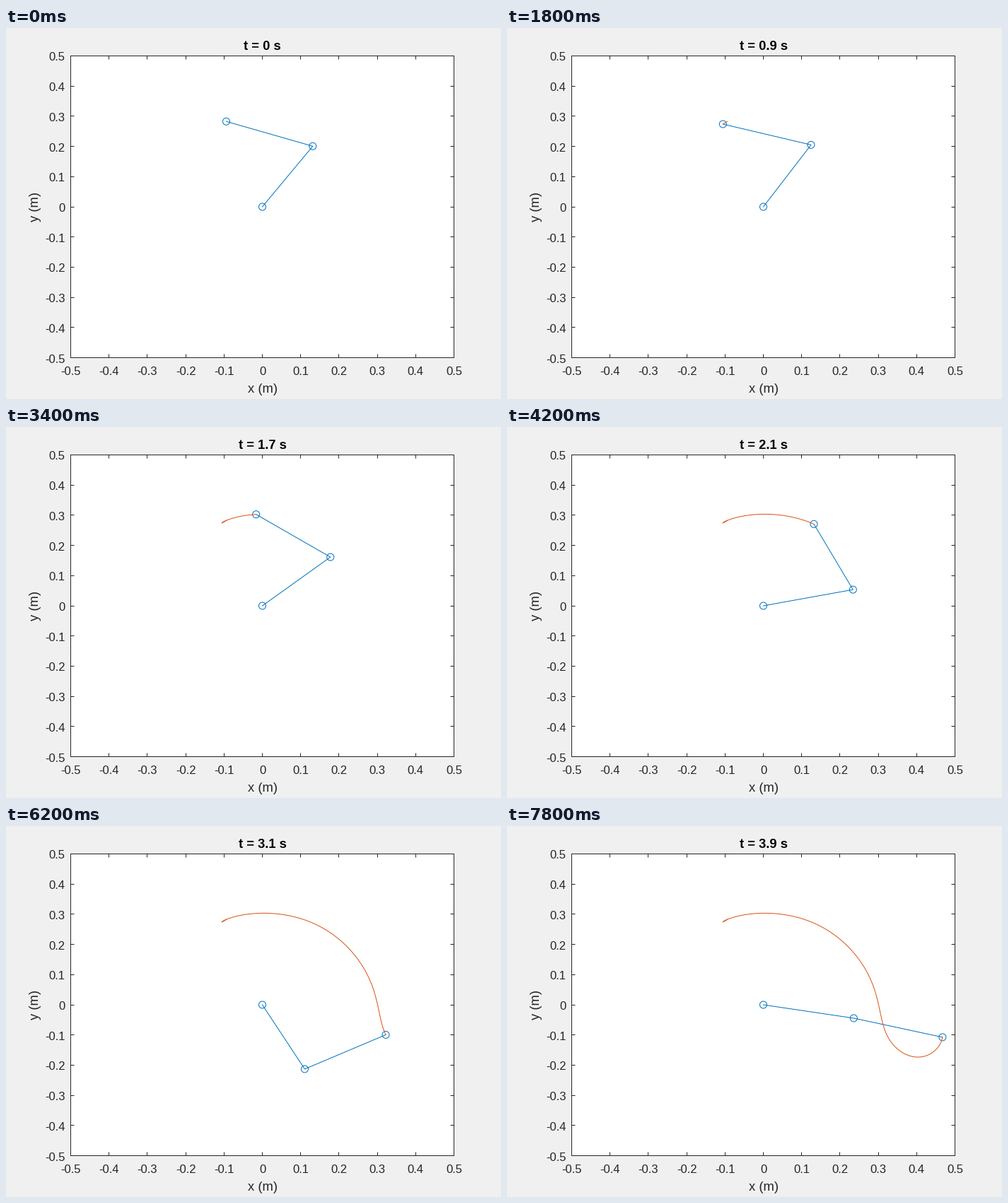
Write a matplotlib script that moves like this. It is 700 by 525 pixels and loops after 8 s.

```python
import numpy as np
import matplotlib.pyplot as plt
from matplotlib.animation import FuncAnimation
from matplotlib.collections import EllipseCollection
from matplotlib.transforms import Affine2D

W, H, DPI = 700, 525, 120
LEFT, TOP, RIGHT, BOTTOM = 91, 39, 633, 466    # plot box in pixels
FRAMES, INTERVAL = 40, 200
STEP = 0.1      # simulated seconds per frame
SUB = 10        # trail points per frame
LINK = 0.24     # length of each arm segment (m)
PX = 72 / DPI   # one pixel in points
BLUE, ORANGE, INK = "#0072BD", "#D95319", "#262626"

plt.rcParams["font.family"] = "Liberation Sans"


def spline(x, y, slope0, slope1, t):
    """Cubic spline through (x, y) with given end slopes."""
    x, y = np.array(x), np.array(y)
    h, d = np.diff(x), np.diff(y) / np.diff(x)
    n = len(x)
    a, b = np.eye(n), np.zeros(n)
    b[0], b[-1] = slope0, slope1
    for i in range(1, n - 1):
        a[i, i - 1:i + 2] = h[i], 2 * (h[i - 1] + h[i]), h[i - 1]
        b[i] = 3 * (h[i] * d[i - 1] + h[i - 1] * d[i])
    m = np.linalg.solve(a, b)
    k = np.clip(np.searchsorted(x, t, side="right") - 1, 0, n - 2)
    u, hk = (t - x[k]) / h[k], h[k]
    return (y[k] * (1 + 2 * u) * (1 - u) ** 2 + y[k + 1] * u**2 * (3 - 2 * u)
            + hk * m[k] * u * (1 - u) ** 2 - hk * m[k + 1] * u**2 * (1 - u))


# Shoulder and relative elbow angles (rad) at a few key times
keys = [0, 0.5, 1.0, 1.3, 1.8, 2.1, 2.4, 2.7, 3.1, 3.6, 3.9]
shoulder = [0.991, 1.0045, 1.026, 0.986, 0.634, 0.225,
            -0.278, -0.754, -1.092, -0.731, -0.186]
elbow = [1.802, 1.812, 1.823, 1.800, 1.771, 1.785,
         1.833, 1.819, 1.585, 0.685, -0.080]

time = np.arange((FRAMES - 1) * SUB + 1) * STEP / SUB
q1 = spline(keys, shoulder, 0, 2.05, time)
q2 = q1 + spline(keys, elbow, 0, -2.75, time)
jx, jy = LINK * np.cos(q1), LINK * np.sin(q1)
ex, ey = jx + LINK * np.cos(q2), jy + LINK * np.sin(q2)

fig = plt.figure(figsize=(W / DPI, H / DPI), dpi=DPI, facecolor="#F0F0F0")
ax = fig.add_axes([LEFT / W, 1 - BOTTOM / H,
                   (RIGHT - LEFT) / W, (BOTTOM - TOP) / H])
ax.set(xlim=(-0.5, 0.5), ylim=(-0.5, 0.5))
ticks = np.arange(-5, 6) / 10
ax.set_xticks(ticks)
ax.set_yticks(ticks)
ax.tick_params(direction="in", length=5.4 * PX, width=PX, color=INK,
               top=True, right=True, labelbottom=False, labelleft=False)
for spine in ax.spines.values():
    spine.set(linewidth=PX, color=INK)


def label(x, y, text, size=10, color=INK, ha="center", **kw):
    """Text with its baseline at pixel (x, y), y counted from the top."""
    return fig.text(x / W, 1 - y / H, text, size=size, color=color,
                    ha=ha, va="baseline", **kw)


for v in ticks:
    label(362.5 + (RIGHT - LEFT) * v, 491, f"{v:g}")
    label(83.5, 260 - (BOTTOM - TOP) * v, f"{v:g}", ha="right")
label(362.8, 516, "x (m)", 11)
label(45.5, 253, "y (m)", 11, rotation=90, rotation_mode="anchor")
title = label(362.8, 31.3, "", 11, "black", weight="bold")

# Data points sit on pixel centres, like the snapped axis lines
centred = ax.transData + Affine2D().translate(0.5, -0.5)
arm, = ax.plot([], [], color=BLUE, lw=PX, transform=centred)
rings = EllipseCollection([10] * 3, [10] * 3, [0] * 3, units="dots",
                          offsets=np.zeros((3, 2)), offset_transform=centred,
                          facecolors="none", edgecolors=BLUE, linewidths=PX,
                          zorder=2)
ax.add_collection(rings, autolim=False)
trail, = ax.plot([], [], color=ORANGE, lw=PX, transform=centred)


def draw(n):
    i = n * SUB
    x, y = [0, jx[i], ex[i]], [0, jy[i], ey[i]]
    arm.set_data(x, y)
    rings.set_offsets(np.column_stack([x, y]))
    trail.set_data(ex[:i + 1], ey[:i + 1])
    title.set_text(f"t = {n / 10:g} s")
    return arm, rings, trail, title


anim = FuncAnimation(fig, draw, frames=FRAMES, interval=INTERVAL,
                     init_func=lambda: draw(0), repeat=True, repeat_delay=0)
plt.show()
```
